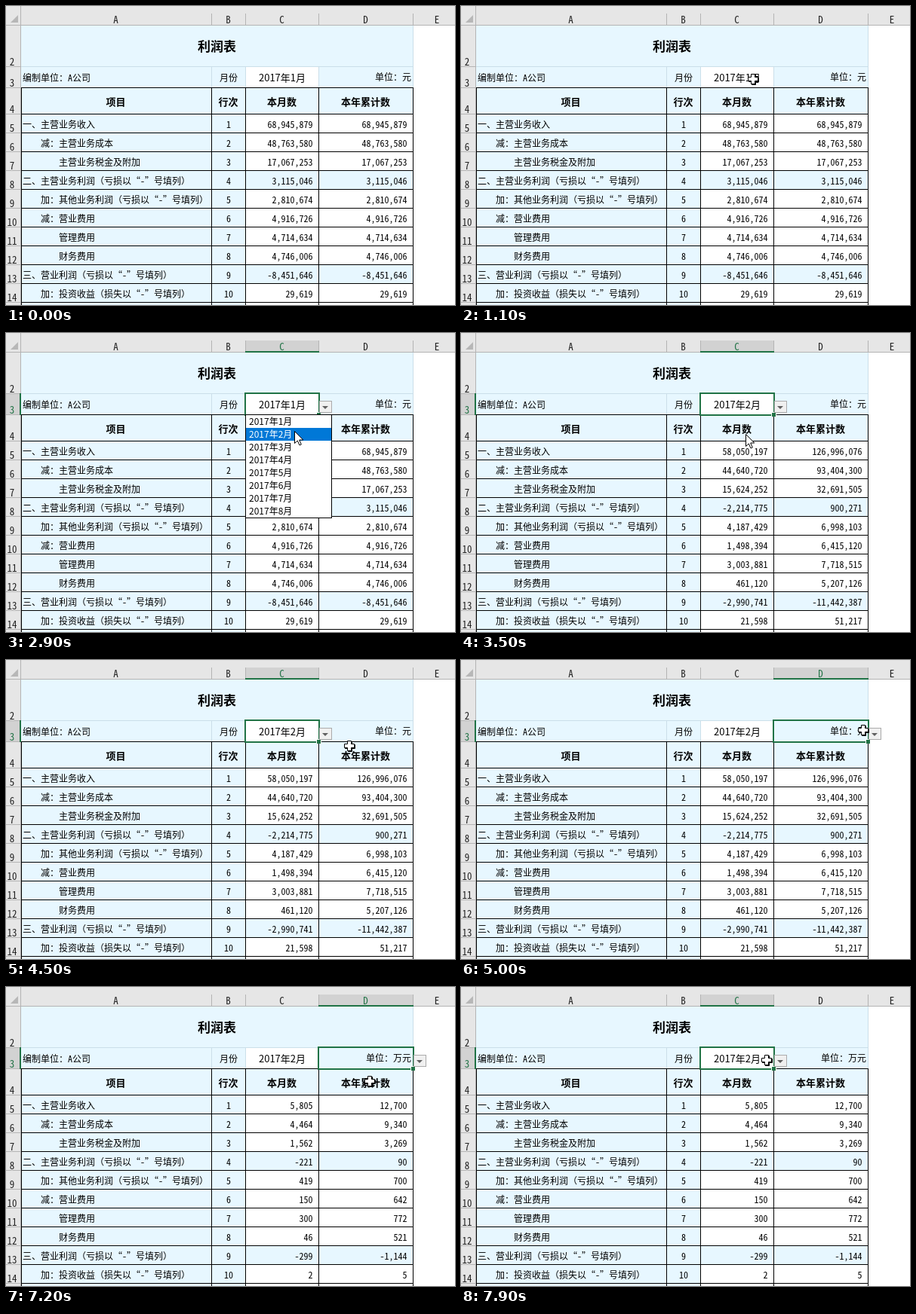
An HTML page for the animation above (8000 ms loop, 595 px wide and 397 px high).

```html
<!DOCTYPE html>
<html lang="zh-CN">
<head>
<meta charset="utf-8">
<style>
html, body { margin: 0; width: 100%; height: 100%; overflow: hidden; background: #fff; }
svg { display: block; }
text { font: 12px "Noto Sans Mono CJK SC", "Noto Sans CJK SC", "Noto Sans CJK", monospace; white-space: pre; }
.ui { font-family: "Noto Sans CJK SC", "Noto Sans CJK", sans-serif; }
</style>
</head>
<body>
<svg id="stage" width="595" height="397" viewBox="0 0 595 397"></svg>
<script>
const stage = document.getElementById('stage');
const BLUE = '#e7f7ff', GREEN = '#217346', HEAD = '#e6e6e6', RULE = '#b4b4b4';
const colX = [19, 272, 317, 414, 539, 615];
const rowY = [25, 80, 108, 143];
while (rowY.length < 15) rowY.push(rowY[rowY.length - 1] + 25);

function add(parent, tag, attrs, content = '') {
  const node = document.createElementNS('http://www.w3.org/2000/svg', tag);
  for (const key in attrs) node.setAttribute(key, attrs[key]);
  node.textContent = content;
  return parent.appendChild(node);
}
const group = () => add(stage, 'g', {});
const rect = (parent, x, y, width, height, fill) => add(parent, 'rect', { x, y, width, height, fill });
const label = (parent, x, y, content, anchor = 'start', style = '', cls = '') =>
  add(parent, 'text', { x, y, 'text-anchor': anchor, style, class: cls }, content);
const heading = (parent, x, y, name, color = '#222') =>
  label(parent, x, y, name, 'middle', `font-size:13px;fill:${color}`);
const show = (node, on) => node.setAttribute('visibility', on ? 'visible' : 'hidden');
const mid = i => (colX[i] + colX[i + 1]) / 2;

// Cell fills and grid
const sheet = group();
rect(sheet, 0, 0, 595, 397, '#fff');
rect(sheet, 20, 26, 519, 371, BLUE);
rect(sheet, 318, 81, 96, 27, '#fff');
for (let r = 3; r < 14; r++)
  if (r !== 6 && r !== 11) rect(sheet, 318, rowY[r] + 1, 221, 24, '#fff');
rect(sheet, 20, 80, 520, 1, '#cbdfe9');
for (const x of colX.slice(1, 5)) rect(sheet, x, 81, 1, 27, '#cbdfe9');
rect(sheet, 539, 26, 1, 55, '#cbdfe9');
for (const y of rowY.slice(2)) rect(sheet, 20, y, 520, 1, '#000');
for (const x of [20, ...colX.slice(1, 5)]) rect(sheet, x, 108, 1, 289, '#000');

// Row and column headings
rect(sheet, 0, 0, 595, 25, HEAD);
rect(sheet, 0, 25, 19, 372, HEAD);
rect(sheet, 0, 25, 595, 1, RULE);
rect(sheet, 19, 0, 1, 397, RULE);
add(sheet, 'path', { d: 'M16 12V22H6Z', fill: '#b7b7b7' });
for (const x of colX.slice(1)) rect(sheet, x, 10, 1, 15, RULE);
for (const y of rowY.slice(1)) rect(sheet, 0, y, 19, 1, RULE);
[...'ABCDE'].forEach((name, i) => heading(sheet, i < 4 ? mid(i) : 571, 23, name));
for (let r = 2; r <= 14; r++) heading(sheet, 8, rowY[r - 1] - 1, r);

// Fixed text
const bold = size => `font-weight:bold;font-size:${size}px`;
label(sheet, 279.5, 60, '利润表', 'middle', bold(17));
label(sheet, 22, 100, '编制单位：A公司');
label(sheet, 295, 100, '月份', 'middle');
['项目', '行次', '本月数', '本年累计数'].forEach((name, i) =>
  label(sheet, mid(i), 132, name, 'middle', bold(13)));
const monthText = label(sheet, 366, 100, '', 'middle', 'font-size:13px', 'ui');
const unitText = label(sheet, 537, 99, '', 'end', '', 'ui');

const items = [
  ['一、主营业务收入', 0, 68945879, 58050197],
  ['减：主营业务成本', 24, 48763580, 44640720],
  ['主营业务税金及附加', 48, 17067253, 15624252],
  ['二、主营业务利润（亏损以“-”号填列）', 0, 3115046, -2214775],
  ['加：其他业务利润（亏损以“-”号填列）', 24, 2810674, 4187429],
  ['减：营业费用', 24, 4916726, 1498394],
  ['管理费用', 48, 4714634, 3003881],
  ['财务费用', 48, 4746006, 461120],
  ['三、营业利润（亏损以“-”号填列）', 0, -8451646, -2990741],
  ['加：投资收益（损失以“-”号填列）', 24, 29619, 21598]
];
const amounts = items.map(([name, indent], i) => {
  const y = 162 + i * 25;
  label(sheet, 22 + indent, y, name);
  label(sheet, 295, y, i + 1, 'middle');
  return [406.5, 531.5].map(x => label(sheet, x, y, '', 'end'));
});

// Selected cell with its highlighted headings and drop-down button
function makeSelection(col) {
  const g = group(), x = colX[col], right = colX[col + 1];
  rect(g, x + 1, 10, right - x - 1, 14, '#d2d2d2');
  rect(g, x, 24, right - x + 1, 2, GREEN);
  rect(g, 0, 81, 18, 27, '#d2d2d2');
  rect(g, 18, 80, 2, 29, GREEN);
  heading(g, mid(col), 23, 'ABCD'[col], GREEN);
  heading(g, 8, 107, '3', GREEN);
  add(g, 'rect', { x, y: 80, width: right - x + 1, height: 29, fill: 'none', stroke: GREEN, 'stroke-width': 2 });
  rect(g, right - 3, 105, 7, 6, '#fff');
  rect(g, right - 2, 106, 5, 5, GREEN);
  add(g, 'rect', { x: right + 1.5, y: 90.5, width: 16, height: 15, fill: '#f0f0f0', stroke: '#ababab' });
  add(g, 'path', { d: `M${right + 5} 97h8l-4 4z`, fill: '#606060' });
  return g;
}

function makeList(x, width, names) {
  const g = group();
  add(g, 'rect', { x: x + .5, y: 108.5, width: width - 1, height: names.length * 17 + 1, fill: '#fff', stroke: '#000' });
  const bar = rect(g, x + 1, 109, width - 2, 17, '#0078d7');
  const rows = names.map((name, i) => label(g, x + 5, 122 + i * 17, name, 'start', '', 'ui'));
  return (on, active) => {
    show(g, on);
    bar.setAttribute('y', 109 + active * 17);
    rows.forEach((row, i) => row.setAttribute('fill', i === active ? '#fff' : '#000'));
  };
}

const selectC = makeSelection(2), selectD = makeSelection(3);
const months = Array.from({ length: 8 }, (_, i) => `2017年${i + 1}月`);
const units = ['单位：元', '单位：万元'];
const monthList = makeList(317, 115, months);
const unitList = makeList(414, 143, units);

const arrow = add(stage, 'path', {
  d: 'M.5.5V16.5L4.3 13 7 19 9.3 18 6.7 12H11.8Z', fill: '#fff', stroke: '#000'
});
const cross = group();
const plus = 'M-2.5-6.5h5v4h4v5h-4v4h-5v-4h-4v-5h4z';
add(cross, 'path', { d: plus, transform: 'translate(1 1)', fill: '#000', stroke: '#000' });
add(cross, 'path', { d: plus, fill: '#fff', stroke: '#000' });

// Pointer stops: time, x, y
const stops = [
  [100, 559, 60], [800, 395, 97], [900, 395, 97], [1300, 378, 97], [1400, 378, 97],
  [1800, 426, 97], [2500, 426, 97], [3000, 377, 134], [4100, 377, 134],
  [4900, 533, 93], [5000, 533, 93], [5300, 548, 97], [5500, 548, 97],
  [5800, 527, 119], [5900, 517, 128], [6100, 513, 130], [7100, 514, 130],
  [7200, 482, 125], [7700, 405, 97], [8000, 405, 97]
];

function pointerAt(t) {
  const i = stops.findIndex(s => s[0] > t);
  const [t0, x0, y0] = stops[i - 1], [t1, x1, y1] = stops[i];
  const p = (t - t0) / (t1 - t0);
  const e = t1 - t0 > 250 ? p * p * (3 - 2 * p) : p;
  return [x0 + (x1 - x0) * e, y0 + (y1 - y0) * e].map(Math.round);
}

let shown = -1;
function draw(now) {
  requestAnimationFrame(draw);
  const t = Math.floor(now % 8000 / 100) * 100;
  if (t === shown) return;
  shown = t;
  const during = (from, to) => t >= from && t < to;
  const scale = t < 6700 ? 1 : 10000;
  const format = v => Math.round(v / scale).toLocaleString('en-US');

  monthText.textContent = months[t < 3300 ? 0 : 1];
  unitText.textContent = units[t < 6500 ? 0 : 1];
  items.forEach(([, , jan, feb], i) => {
    const february = t >= 3500;
    amounts[i][0].textContent = format(february ? feb : jan);
    amounts[i][1].textContent = format(february ? jan + feb : jan);
  });

  show(selectC, during(1300, 4900) || t >= 7800);
  show(selectD, during(4900, 7800));
  const moving = t >= 100;
  const [x, y] = moving ? pointerAt(t) : [0, 0];
  monthList(during(2100, 3300), y >= 126 ? 1 : 0);
  unitList(during(5500, 6500), y >= 126 ? 1 : 0);

  const isArrow = t < 200 || during(1700, 4200) || during(5200, 7200);
  show(arrow, moving && isArrow);
  show(cross, moving && !isArrow);
  for (const node of [arrow, cross]) node.setAttribute('transform', `translate(${x} ${y})`);
}
requestAnimationFrame(draw);
</script>
</body>
</html>
```
